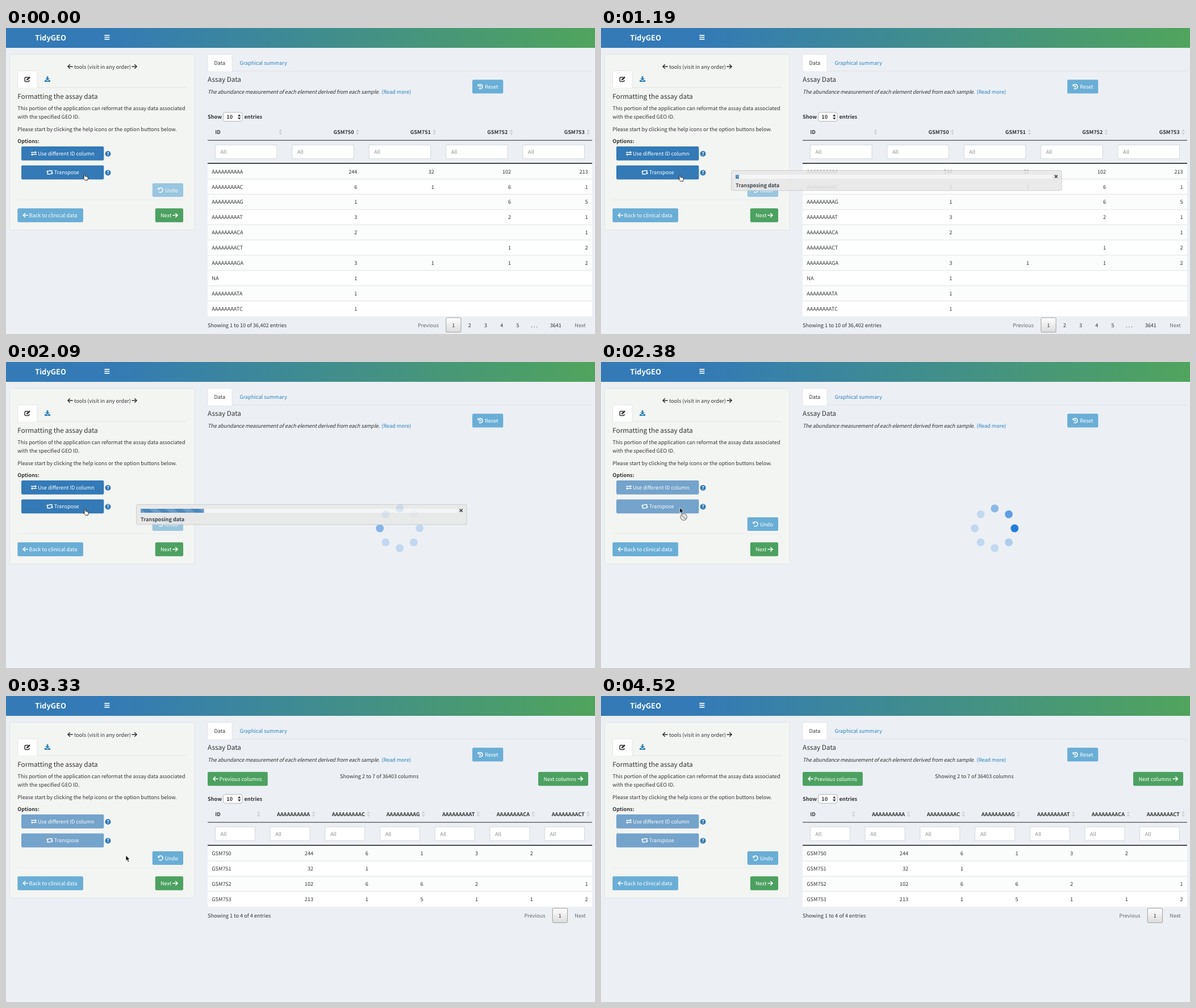
Write an HTML page that moves like this. It is 1037 by 540 pixels and loops after 6170 ms.

```html
<!DOCTYPE html>
<html lang="en">
<head>
<meta charset="utf-8">
<title>Transposing assay data</title>
<style>
  html, body { margin: 0; width: 100%; height: 100%; overflow: hidden; background: #ecf0f5; }
  svg { display: block; width: 100%; height: 100%; }
  text {
    font-family: "Noto Sans CJK JP", "Noto Sans CJK SC", "Noto Sans CJK", "Noto Sans", sans-serif;
    text-rendering: geometricPrecision;
    white-space: pre;
  }
</style>
</head>
<body>
<svg id="stage" viewBox="0 0 1037 540" xmlns="http://www.w3.org/2000/svg"></svg>
<script>
const INK = '#333', BLUE = '#337ab7', SKY = '#6aaed6', GREEN = '#4ca160', LINK = '#2a80b9';
const LOOP = 6170;
const STEPS = [0, 150, 300, 1190, 1340, 1490, 1640, 1790, 1940, 2090, 2230, 2380,
  2530, 2680, 3330, 3480, 3630, 3770, 3920, 4070, 4370, 4520];

// ---------- drawing helpers ----------
const rect = (x, y, w, h, fill, more = '') =>
  `<rect x="${x}" y="${y}" width="${w}" height="${h}" fill="${fill}" ${more}/>`;
const line = (x1, y, x2, color, width = 1) =>
  `<path d="M${x1} ${y}H${x2}" stroke="${color}" stroke-width="${width}"/>`;
const group = (id, body, more = '') => `<g id="${id}" ${more}>${body}</g>`;

// The type face draws Latin letters about 1.117 times larger than its nominal size.
function text(x, y, label, { size = 10.2, bold, anchor = 'start', fill = INK, more = '' } = {}) {
  return `<text x="${x}" y="${y}" font-size="${(size / 1.117).toFixed(3)}" fill="${fill}"
    font-weight="${bold ? 700 : 400}" text-anchor="${anchor}" ${more}>${label}</text>`;
}

const ICONS = {
  right: ['M-4.6 0H3.8M.2 -3.8L4.1 0L.2 3.8', ''],
  left: ['M4.6 0H-3.8M-.2 -3.8L-4.1 0L-.2 3.8', ''],
  undo: ['M-3.6 -1.8A4 4 0 1 1 -2.6 3.1', 'M-4.7 -4.6V-.6H-.7Z'],
  history: ['M-3.6 -1.8A4 4 0 1 1 -2.6 3.1M.2 -2V.6H-1.6', 'M-4.7 -4.6V-.6H-.7Z'],
  swap: ['M-5 -1.9H3M5 1.9H-3', 'M2.2 -4.3L5.2 -1.9L2.2 .5ZM-2.2 4.3L-5.2 1.9L-2.2 -.5Z'],
  loop: ['M-3.9 -1V3H2M3.9 1V-3H-2', 'M-6.3 -.7H-1.5L-3.9 -3.8ZM6.3 .7H1.5L3.9 3.8Z'],
  edit: ['M1.5 -3.4H-3.2Q-4.3 -3.4 -4.3 -2.3V3Q-4.3 4 -3.2 4H2.2Q3.2 4 3.2 3V1.2',
    'M-1.6 1.9L-1.2 -.2L3.5 -4.9L5.4 -3L.6 1.5Z'],
  save: ['', 'M-1.4 -5H1.4V-1.3H4L0 2.5L-4 -1.3H-1.4ZM-5 1.8H-2L0 3.7L2 1.8H5V4.8H-5Z'],
};
function icon(name, x, y, color = '#fff') {
  const [stroke, solid] = ICONS[name];
  return `<g transform="translate(${x} ${y})"><path d="${stroke}" fill="none" stroke="${color}"
    stroke-width="1.5"/><path d="${solid}" fill="${color}"/></g>`;
}

function button(x, y, w, h, fill, label, labelX, iconName, iconX) {
  const mid = y + h / 2;
  return rect(x, y, w, h, fill, 'rx="2.2"') + icon(iconName, iconX, mid) +
    text(labelX, mid + 3.6, label, { fill: '#fff' });
}

const help = y => `<circle cx="179.5" cy="${y}" r="5" fill="${BLUE}"/>` +
  text(179.5, y + 3, '?', { size: 9, bold: true, anchor: 'middle', fill: '#fff' });

// ---------- fixed page parts ----------
function header() {
  return rect(0, 0, 1037, 35, 'url(#bar)') +
    text(78.5, 21.8, 'TidyGEO', { size: 14.4, bold: true, anchor: 'middle', fill: '#fff' }) +
    [12.2, 15.6, 19].map(y => rect(173.3, y, 9, 1.7, '#fff')).join('');
}

function sidebar() {
  return rect(6.5, 46.5, 326, 310, '#f3f5f3', 'rx="2" stroke="#e0e4e6"') +
    icon('left', 113, 68, INK) + text(120, 71.5, 'tools (visit in any order)') + icon('right', 226, 68, INK) +
    line(20, 105, 318, '#dde0e0', .8) +
    `<path d="M20.5 105.5V77.5Q20.5 75.6 22.4 75.6H53Q55 75.6 55 77.5V105.5" fill="#fff" stroke="#ddd" stroke-width=".8"/>` +
    icon('edit', 37.5, 90.5, INK) + icon('save', 73, 90.3, LINK) +
    text(20.3, 124.5, 'Formatting the assay data', { size: 13.1 }) +
    text(20.3, 145, 'This portion of the application can reformat the assay data associated') +
    text(20.3, 159.6, 'with the specified GEO ID.') +
    text(20.3, 181.5, 'Please start by clicking the help icons or the option buttons below.') +
    text(20.3, 203.3, 'Options:', { bold: true }) +
    group('options',
      button(27, 209, 145.3, 24.8, BLUE, 'Use different ID column', 56, 'swap', 49) +
      button(27, 242.4, 145.3, 24.8, BLUE, 'Transpose', 84.8, 'loop', 77)) +
    help(222) + help(255.4) +
    group('undo', button(257.7, 274, 54.3, 24, SKY, 'Undo', 279.7, 'undo', 272)) +
    line(20, 303, 312, '#e4e8e9', .9) +
    button(20.3, 318.2, 115.6, 24.6, SKY, 'Back to clinical data', 40.5, 'left', 34.3) +
    button(262.8, 318.2, 49.2, 24.6, GREEN, 'Next', 272, 'right', 298);
}

function mainHead() {
  return line(355, 76, 1032, '#dadee3', .8) +
    `<path d="M355 76.5V48.5Q355 46.5 357 46.5H396Q398 46.5 398 48.5V76.5" fill="#fff" stroke="#ddd" stroke-width=".8"/>` +
    text(366.5, 65.2, 'Data') +
    text(411.5, 65.2, 'Graphical summary', { fill: LINK }) +
    text(355, 95.4, 'Assay Data', { size: 13.1 }) +
    text(355, 116.1, 'The abundance measurement of each element derived from each sample.',
      { more: 'font-style="italic" letter-spacing="-.135"' }) +
    text(661.3, 116.1, '(Read more)', { fill: LINK }) +
    button(821, 91.2, 54.3, 24.4, SKY, 'Reset', 843.2, 'history', 835);
}

// ---------- tables ----------
const IDS = ['AA', 'AC', 'AG', 'AT', 'CA', 'CT', 'GA', '', 'TA', 'TC'].map(s => s ? 'AAAAAAAA' + s : 'NA');
const SAMPLES = ['GSM750', 'GSM751', 'GSM752', 'GSM753'];
const COUNTS = ['244,32,102,213', '6,1,6,1', '1,,6,5', '3,,2,1', '2,,,1', ',,1,2', '3,1,1,2', '1,,,', '1,,,', '1,,,']
  .map(row => row.split(','));
const ROW = 26.9, LEFT = 355, RIGHT = 1032;

function sorter(x, y) {
  return `<path d="M${x - 2.8} ${y - .9}h5.6l-2.8 -4.3zM${x - 2.8} ${y + .9}h5.6l-2.8 4.3z" fill="#cdd2d8"/>`;
}

function table(dy, cols, names, cells, summary, pages) {
  const pitch = (RIGHT - LEFT) / (cols.length + 1);
  const top = 239.6 + dy, bottom = top + ROW * names.length;
  let s = text(355, 160.3 + dy, 'Show', { bold: true }) +
    rect(382.5, 149 + dy, 33.5, 15.6, '#fff', 'rx="3" stroke="#a9adb2" stroke-width=".9"') +
    text(388.3, 160.3 + dy, '10', { bold: true }) +
    `<path d="M408 ${155.9 + dy}h5.4l-2.7 -3.7zM408 ${157.9 + dy}h5.4l-2.7 3.7z" fill="${INK}"/>` +
    text(419.5, 160.3 + dy, 'entries', { bold: true });

  ['ID', ...cols].forEach((name, i) => {
    const x = LEFT + i * pitch, end = x + pitch;
    s += i ? text(end - 13.2, 187.3 + dy, name, { bold: true, anchor: 'end' })
           : text(368.3, 187.3 + dy, name, { bold: true });
    s += sorter(end - 7, 183.8 + dy) +
      rect(x + 13.4, 206.3 + dy, pitch - 26.8, 24.4, '#fff', 'stroke="#cfd4da" stroke-width=".9"') +
      text(x + 22.5, 222.1 + dy, 'All', { fill: '#8a8d91' });
  });

  names.forEach((name, r) => {
    const y = top + r * ROW, base = y + 17;
    s += rect(LEFT, y, RIGHT - LEFT, ROW, r % 2 ? '#fff' : '#fbfcfc');
    if (r) s += line(LEFT, y, RIGHT, '#dcdfe2', .9);
    s += text(362.3, base, name);
    cells[r].forEach((v, c) => {
      if (v) s += text(LEFT + (c + 2) * pitch - 7.4, base, v, { anchor: 'end' });
    });
  });

  s += line(LEFT, 198.2 + dy, RIGHT, '#222', 1) + line(LEFT, 238.8 + dy, RIGHT, '#111', 1.5);
  const base = bottom + 19;
  const grey = { fill: '#666', anchor: 'middle' };
  s += text(355, base, summary) +
    text(1011, base, 'Next', grey) + text(pages.prev, base, 'Previous', grey) +
    rect(pages.box, bottom + 2.6, 26.2, 25.6, 'url(#page)', 'rx="1.5" stroke="#979797" stroke-width=".9"') +
    text(pages.box + 13.1, base, '1', { anchor: 'middle' });
  for (const [x, label] of pages.more) s += text(x, base, label, { anchor: 'middle' });
  return s;
}

const before = table(0, SAMPLES, IDS, COUNTS, 'Showing 1 to 10 of 36,402 entries', {
  prev: 743.5, box: 774.8,
  more: [[816.2, '2'], [844.5, '3'], [872.8, '4'], [901, '5'], [930, '. . .'], [967.8, '3641']],
});
const transposed = SAMPLES.map((_, c) => COUNTS.slice(0, 6).map(row => row[c]));
const after = table(24.7, IDS.slice(0, 6), SAMPLES, transposed, 'Showing 1 to 4 of 4 entries',
  { prev: 931, box: 962.3, more: [] });

const columnNav =
  button(355, 134, 105.8, 24.4, GREEN, 'Previous columns', 375.5, 'left', 369) +
  button(937, 134, 88, 24.4, GREEN, 'Next columns', 946.4, 'right', 1011.2);

// ---------- progress note, spinner, pointers ----------
const STRIPE = 29.1;
const note = rect(229.5, 251.5, 581.5, 35.4, '#e8e8e8', 'rx="2" stroke="#c8c8c8"') +
  rect(237, 259, 558, 7, '#f5f5f5', 'rx="1"') +
  rect(237, 259, 0, 7, BLUE, 'class="fill"') + rect(237, 259, 0, 7, 'url(#stripes)', 'class="fill"') +
  `<path d="M798.7 259.5L803.7 264.5M803.7 259.5L798.7 264.5" stroke="#222" stroke-width="1.7"/>` +
  text(237, 281.3, 'Transposing data', { bold: true });

let dots = '';
for (let k = 0; k < 8; k++) {
  const a = k * Math.PI / 4;
  dots += `<circle cx="${693.2 + 35 * Math.sin(a)}" cy="${293.5 - 35 * Math.cos(a)}" r="6.9" fill="#1b78dc"/>`;
}

const hand = `<path d="M2 8.2V2Q2 .8 3 .8T4 2V5Q5 4.4 5.6 5.3Q6.6 4.8 7.2 5.7Q8.7 5.2 9.1 6.8V9L8.2 12H4L.8 8.6Q.3 7.3 1.3 7.4Z"
  fill="#fff" stroke="#111" stroke-width=".9" stroke-linejoin="round"/>`;
const arrow = `<path d="M0 0V9.6L2.2 7.6L4 11.6L5.7 10.8L4 7H7Z" fill="#000" stroke="#fff" stroke-width=".8"/>`;
const blocked = `<g fill="#e6e6e6" stroke="#8d8d8d" stroke-width="1.3"><circle cx="7" cy="16.6" r="5.7"/>
  <path d="M3 12.6L11 20.6"/></g>`;

const defs = `<defs>
  <linearGradient id="bar"><stop offset=".16" stop-color="${BLUE}"/><stop offset="1" stop-color="#50a45c"/></linearGradient>
  <linearGradient id="page" x2="0" y2="1"><stop stop-color="#fff"/><stop offset="1" stop-color="#dcdcdc"/></linearGradient>
  <pattern id="stripes" patternUnits="userSpaceOnUse" width="${STRIPE}" height="7">
    <path d="M0 0H${STRIPE / 2}l7 7H7Z" fill="#fff" fill-opacity=".17"/></pattern>
</defs>`;

const stage = document.getElementById('stage');
stage.innerHTML = defs + rect(0, 0, 1037, 540, '#ecf0f5') + header() + sidebar() + mainHead() +
  group('before', before) + group('nav', columnNav) +
  group('after', text(657.2, 145.1, 'Showing 2 to 7 of 36403 columns', { anchor: 'middle' }) + after) +
  group('spinner', dots) + group('note', note, 'opacity=".87"') +
  group('click', '<circle cx="136.3" cy="256" r="18.8" fill="#e2d910" fill-opacity=".66"/>') +
  group('hand', hand) + group('arrow', arrow + group('blocked', blocked));

// ---------- motion ----------
const get = id => document.getElementById(id);
const show = (id, on) => get(id).setAttribute('display', on ? 'inline' : 'none');
const move = (id, x, y) => get(id).setAttribute('transform', `translate(${x} ${y})`);
const fills = document.querySelectorAll('.fill');
const spinnerDots = get('spinner').children;

const POINTER = [[2380, 138.6, 257], [3330, 211, 281.3], [3480, 462.5, 351.5], [3630, 482.5, 363.4],
  [3770, 491.5, 368.3], [3920, 649.5, 435.6], [4070, 768, 489.3], [4370, 813, 499.6]];

// Standard CSS "ease" curve: cubic-bezier(.25, .1, .25, 1)
function ease(x) {
  if (x <= 0) return 0;
  if (x >= 1) return 1;
  const curve = (a, b, u) => 3 * a * u * (1 - u) ** 2 + 3 * b * u * u * (1 - u) + u ** 3;
  let lo = 0, hi = 1;
  for (let i = 0; i < 24; i++) {
    const mid = (lo + hi) / 2;
    if (curve(.25, .25, mid) < x) lo = mid; else hi = mid;
  }
  return curve(.1, 1, lo);
}

const glow = d => ({ 0: 1, 7: .7, 6: .5 })[(d + 16) % 8] || .2;

function draw(time) {
  const t = STEPS.filter(s => s <= time).pop();
  const within = (a, b) => t >= a && t < b;

  show('before', t < 2090);
  show('nav', t >= 2530);
  show('after', t >= 2680);
  show('click', within(300, 1190));
  show('note', within(1190, 2230));
  show('spinner', within(2090, 2680));
  show('hand', t < 2380);
  show('arrow', within(2380, 4520));
  show('blocked', t < 3330);
  get('options').setAttribute('opacity', t < 2380 ? 1 : .66);
  get('undo').setAttribute('opacity', t < 2380 ? .65 : 1);

  const width = 111.6 * ease((t - 1148) / 600);
  fills.forEach(f => f.setAttribute('width', width));
  const shift = STRIPE * (1 - (t - 1148) / 2000);
  get('stripes').setAttribute('patternTransform', `translate(${237 + shift} 259)`);

  const phase = Math.max(0, t - 2090) / 1100 * 8 % 8, step = Math.floor(phase), mix = phase - step;
  for (let k = 0; k < 8; k++) {
    const level = glow(k - step) * (1 - mix) + glow(k - step - 1) * mix;
    spinnerDots[k].setAttribute('opacity', level);
  }

  if (t < 150) move('hand', 135.2, 256.7); else move('hand', 136, 258.4);
  const spot = POINTER.filter(p => p[0] <= t).pop();
  if (spot) move('arrow', spot[1], spot[2]);
}

const start = performance.now();
function tick() {
  draw((performance.now() - start) % LOOP);
  requestAnimationFrame(tick);
}
tick();
</script>
</body>
</html>
```
